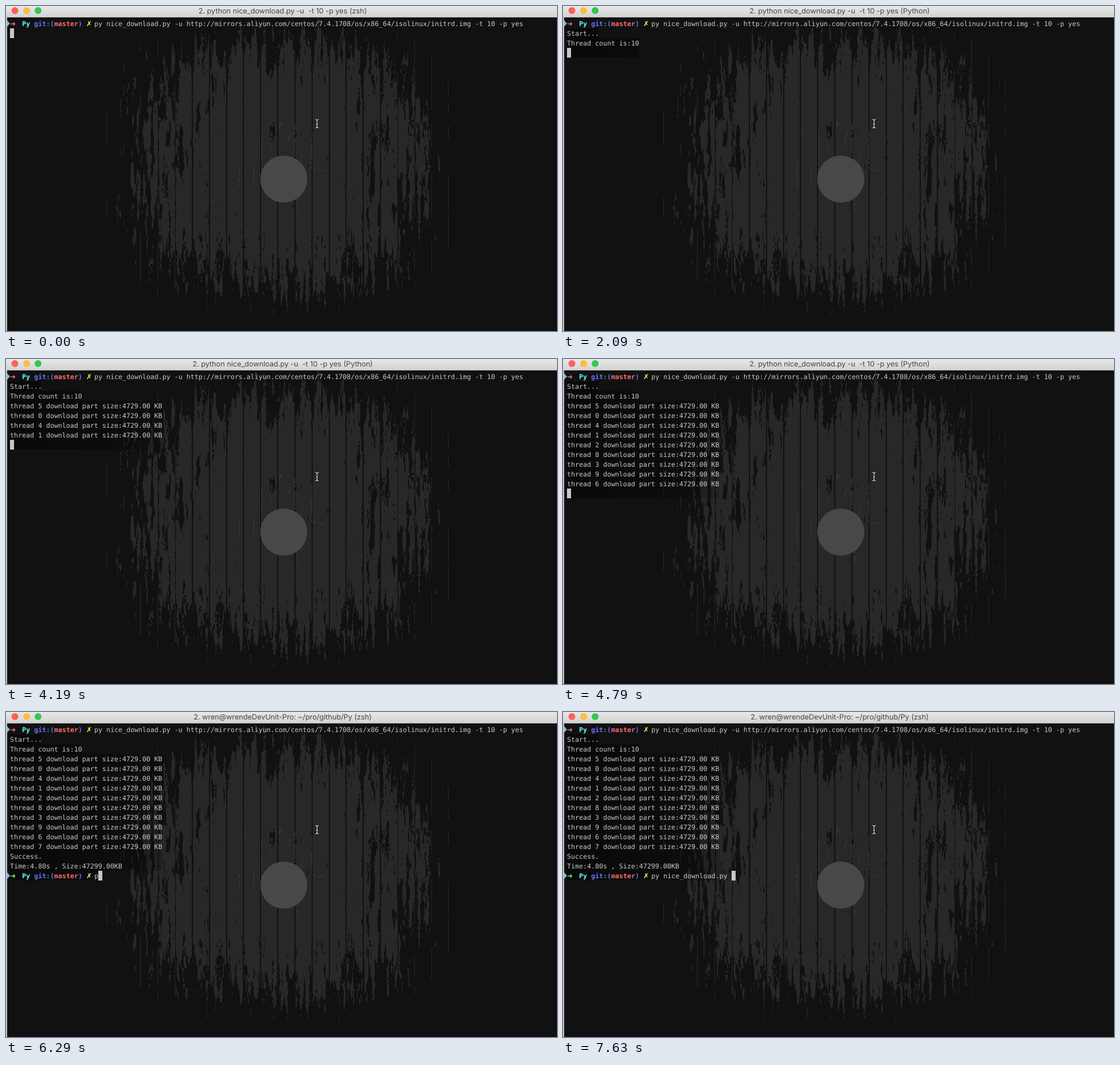
Write an HTML page with a canvas that moves like this. It is 961 by 567 pixels and loops after 8000 ms.

```html
<!DOCTYPE html>
<html lang="en">
<head>
<meta charset="utf-8">
<title>Threaded download in a terminal</title>
<style>
html, body { margin: 0; width: 100%; height: 100%; overflow: hidden; background: #111; }
canvas, svg { position: absolute; left: 0; top: 0; width: 961px; height: 567px; }
text { white-space: pre; text-rendering: geometricPrecision; }
.mono { font: 11.627px "DejaVu Sans Mono", "Liberation Mono", monospace; fill: #c9c9c9; }
.bold { font-weight: bold; }
.sign { font: bold 12px "DejaVu Sans", sans-serif; }
#title { font: 12.65px Inter, "Open Sans", sans-serif; fill: #444; text-anchor: middle; }
</style>
</head>
<body>
<canvas id="wood" width="961" height="567"></canvas>
<svg id="stage" viewBox="0 0 961 567" xmlns="http://www.w3.org/2000/svg">
  <defs>
    <linearGradient id="bar" x2="0" y2="1">
      <stop stop-color="#e8e8e8"/><stop offset="1" stop-color="#d2d2d2"/>
    </linearGradient>
    <linearGradient id="dim" gradientUnits="userSpaceOnUse" x1="7" x2="273" y1="0" y2="0">
      <stop stop-opacity=".5"/><stop offset="1" stop-opacity=".16"/>
    </linearGradient>
  </defs>
  <g fill="none" stroke="#414141">
    <path d="M533.5 220V284M503.5 208V262M445.5 222V300M432.5 278V308" stroke-dasharray="9 3 4 6 15 2"/>
    <path d="M407.5 275V316M417.5 208V222M461.5 240V256M516.5 250V300M508.5 318V362" stroke-dasharray="3 5 6 4"/>
    <path d="M477 213L478.500 201L482 209M535 285H541M545 287H555M491 238L496 222"/>
  </g>
  <circle cx="484.500" cy="302" r="41" fill="#484848"/>
  <path id="shade" fill="url(#dim)"/>
  <rect width="961" height="20" fill="url(#bar)"/>
  <rect y="19" width="961" height="1" fill="#b4b4b4"/>
  <rect y="20" width="2" height="547" fill="#c4c4c4"/>
  <circle cx="15.500" cy="8" r="6" fill="#fc605c"/>
  <circle cx="36" cy="8" r="6" fill="#fdbc40"/>
  <circle cx="56" cy="8" r="6" fill="#34c84a"/>
  <text id="title" x="482.500" y="13"></text>
  <g id="rows"></g>
  <rect id="cursor" width="7" height="17" fill="#c7c7c7"/>
  <g fill="none" stroke-linecap="round">
    <path id="beam" d="M539.500 197.500Q542.500 198 542.500 201V209Q542.500 212.500 539.500 213M545.500 197.500Q542.500 198 542.500 201V209Q542.500 212.500 545.500 213M541 206H544" stroke="#111" stroke-width="3"/>
    <use href="#beam" style="stroke:#ddd"/>
    <path d="M539.500 197.500Q542.500 198 542.500 201V209Q542.500 212.500 539.500 213M545.500 197.500Q542.500 198 542.500 201V209Q542.500 212.500 545.500 213M541 206H544" stroke="#ddd" stroke-width="1.200"/>
  </g>
</svg>
<script>
const LOOP = 8000, CELL = 7, ROW = 17, LEFT = 7, TOP = 22;
const $ = id => document.getElementById(id);
const colX = c => LEFT + c * CELL;
const rowY = r => TOP + r * ROW;

// ---- Plank backdrop: streaky noise, thinning out towards an oval edge ----
function hash(x, y, seed) {
  let h = Math.imul(x, 374761393) ^ Math.imul(y, 668265263) ^ Math.imul(seed, 974711);
  h = Math.imul(h ^ (h >>> 13), 1274126177);
  h = Math.imul(h ^ (h >>> 15), 2246822519);
  return ((h ^ (h >>> 16)) >>> 0) / 4294967296;
}

function noise(x, y, seed) {
  const ix = Math.floor(x), iy = Math.floor(y);
  const ease = v => v * v * (3 - 2 * v);
  const fx = ease(x - ix), fy = ease(y - iy);
  const mix = (a, b, k) => a + (b - a) * k;
  return mix(
    mix(hash(ix, iy, seed), hash(ix + 1, iy, seed), fx),
    mix(hash(ix, iy + 1, seed), hash(ix + 1, iy + 1, seed), fx), fy);
}

// Worn patches: centre, half width, half height
const WORN = [
  [335, 205, 9, 55], [461, 90, 9, 60], [463, 205, 8, 45], [612, 190, 7, 60],
  [306, 255, 6, 60], [372, 75, 8, 35], [638, 270, 9, 90], [605, 450, 9, 40], [496, 490, 8, 40]
];

function isWood(x, y) {
  const dx = Math.abs(x - 480), dy = Math.abs(y - 275);
  const edge = (dx / 300) ** 2.5 + (dy / 262) ** 3;
  if (edge > 1.1 || y < 20) return false;
  const pitch = 29.84, plank = Math.floor((x - 174.2) / pitch);
  const inset = x - 174.2 - plank * pitch;
  if (dx > 185 && inset < 1) return noise(x, y / 18, 9) > 0.2 + edge * 0.3;
  if (inset < 2) return false;
  const n = 0.5 * noise(x / 5, y / 45, plank + 20)
          + 0.3 * noise(x / 2, y / 14, 2)
          + 0.2 * noise(x / 1.2, y / 4, 3);
  let limit = 0.03 + 0.87 * edge + 0.12 * (hash(plank, 5, 7) - 0.5) * edge;
  limit += 0.12 * Math.max(0, 1 - Math.min(inset - 2, pitch - inset) / 4);
  for (const [cx, cy, w, h] of WORN) {
    const d = ((x - cx) / w) ** 2 + ((y - cy) / h) ** 2;
    if (d < 1) limit += 0.4 * (1 - d);
  }
  return 0.5 + (n - 0.5) * 1.25 > limit;
}

function paintWood() {
  const g = $("wood").getContext("2d");
  g.fillStyle = "#111";
  g.fillRect(0, 0, 961, 567);
  g.fillStyle = "#282828";
  for (let x = 170; x < 800; x++) {
    let start = -1;
    for (let y = 20; y <= 567; y++) {
      const on = y < 567 && isWood(x, y);
      if (on && start < 0) start = y;
      if (!on && start >= 0) {
        g.fillRect(x, start, 1, y - start);
        start = -1;
      }
    }
  }
}

// ---- Terminal content ----
const COMMAND = "py nice_download.py -u http://mirrors.aliyun.com/centos/7.4.1708/os/x86_64/isolinux/initrd.img -t 10 -p yes";
const RUN = "2. python nice_download.py -u  -t 10 -p yes ";
const HOME = "2. wren@wrendeDevUnit-Pro: ~/pro/github/Py ";
const TITLES = [[0, RUN + "(zsh)"], [2090, RUN + "(Python)"], [4940, HOME + "(Python)"], [5690, HOME + "(zsh)"]];

const part = (id, size) => `thread ${id} download part size:${size} KB`;
const OUTPUT = [
  [150, "Start..."],
  [290, "Thread count is:10"],
  ...[[3740, 5], [3740, 0], [4040, 4], [4190, 1], [4640, 2], [4640, 8], [4790, 3], [4790, 9], [4790, 6], [4940, 7]]
    .map(([at, id]) => [at, part(id, "4729.00")]),
  [4940, "Success."],
  [4940, "Time:4.80s , Size:47299.00KB"]
];
const LAST = OUTPUT.length + 1, PROMPT_AT = 5090, INPUT_COL = 21;
const TYPED = "py nice_download.py ";
const KEYS = [[0, 0], [6290, 1], [6440, 2], [6740, 3], [7190, 4], [7340, 5], [7490, 6], [7630, 20]];

// Dimmed text areas: time, right edge, top, bottom
const SHADES = [
  [150, 61, 39, 73], [290, 133, 56, 90], [3740, 273, 73, 124], [4040, 273, 107, 141],
  [4190, 273, 124, 158], [4640, 273, 141, 192], [4790, 273, 175, 243], [4940, 273, 226, 277],
  [5090, 161, 277, 294], [7630, 301, 277, 294]
];

const latest = (list, t) => list.filter(([at]) => at <= t).pop()[1];

function add(tag, attrs, parent, content = "") {
  const el = document.createElementNS("http://www.w3.org/2000/svg", tag);
  for (const k in attrs) el.setAttribute(k, attrs[k]);
  el.textContent = content;
  return parent.appendChild(el);
}

function addText(row, col, content, parent, fill, cls = "mono") {
  const attrs = { x: colX(col), y: rowY(row) + 13, class: cls };
  if (fill) attrs.style = "fill:" + fill;
  return add("text", attrs, parent, content);
}

function addPrompt(row, arrow) {
  const g = add("g", {}, $("rows")), y = rowY(row);
  add("path", { d: `M2 ${y + 3}L7 ${y + 8.5}L2 ${y + 14}z`, fill: "#7db4e8" }, g);
  addText(row, 0, "➜", g, arrow, "sign");
  const bold = (col, s, fill) => addText(row, col, s, g, fill, "mono bold");
  bold(3, "Py", "#60fdff");
  bold(6, "git:(", "#6871ff");
  bold(11, "master", "#ff6e67");
  bold(17, ")", "#6871ff");
  addText(row, 19, "✗", g, "#fffc67", "sign");
  return g;
}

paintWood();
addPrompt(0, "#ff6e67");
addText(0, INPUT_COL, COMMAND, $("rows"));
const lines = OUTPUT.map(([at, s], i) => ({ at, el: addText(i + 1, 0, s, $("rows")) }));
lines.push({ at: PROMPT_AT, el: addPrompt(LAST, "#5ffa68") });
const input = addText(LAST, INPUT_COL, "", $("rows"));

function draw(t) {
  for (const { at, el } of lines) el.setAttribute("visibility", t >= at ? "visible" : "hidden");
  const typed = latest(KEYS, t);
  input.textContent = TYPED.slice(0, typed);
  $("title").textContent = latest(TITLES, t);
  $("shade").setAttribute("d", SHADES.filter(([at]) => at <= t)
    .map(([, right, top, bottom]) => `M7 ${top}H${right}V${bottom}H7z`).join(""));
  const row = 1 + OUTPUT.filter(([at]) => at <= t).length;
  $("cursor").setAttribute("x", colX(t >= PROMPT_AT ? INPUT_COL + typed : 0));
  $("cursor").setAttribute("y", rowY(row));
}

const begin = performance.now();
function tick() {
  draw((performance.now() - begin) % LOOP);
  requestAnimationFrame(tick);
}
tick();
</script>
</body>
</html>
```
